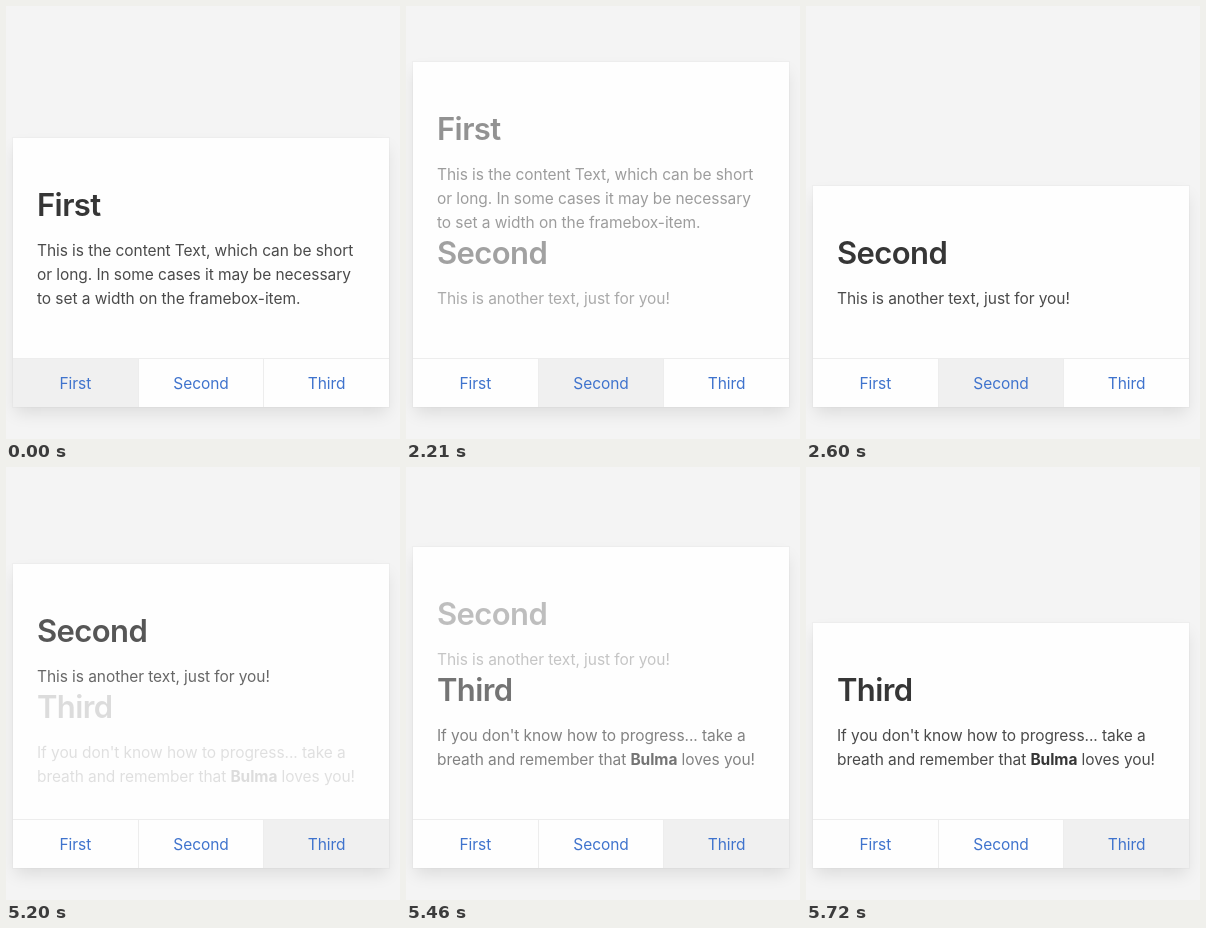
Animation of 394 by 433 pixels, one loop 7020 ms. Source, as an HTML page:

```html
<!DOCTYPE html>
<html lang="en">
<head>
<meta charset="utf-8">
<style>
  html, body { margin: 0; width: 100%; height: 100%; overflow: hidden; background: #f4f4f4; }
  body {
    position: relative;
    font: 15.5px/24px Inter, "Open Sans", sans-serif;
    font-optical-sizing: none;
    letter-spacing: -.07px;
    color: #4a4a4a;
  }
  .card {
    position: absolute; left: 7px; bottom: 32px; width: 376px;
    background: #fefefe;
    box-shadow: 0 8px 16px -2px rgba(10,10,10,.1), 0 0 0 1px rgba(10,10,10,.02);
  }
  .content { padding: 48px 0 48px 24px; white-space: nowrap; }
  h1, p { position: relative; margin: 0; }
  h1 { top: 1px; margin-bottom: 16px; font-size: 31px; line-height: 36px; font-weight: 600; letter-spacing: -.6px; color: #363636; }
  p { top: .5px; }
  strong { font-weight: 700; color: #363636; }
  .tabs { display: flex; height: 48px; border-top: 1px solid #ededed; }
  .tabs span { flex: 1; line-height: 49px; height: 48px; text-align: center; color: #3f73cd; border-right: 1px solid #ededed; }
  .tabs span:last-child { border: 0; }
  .tabs .active { background: #f0f0f0; }
</style>
</head>
<body>
<div class="card">
  <div class="content">
    <section><h1>First</h1><p>This is the content Text, which can be short<br>or long. In some cases it may be necessary<br>to set a width on the framebox-item.</p></section>
    <section><h1>Second</h1><p>This is another text, just for you!</p></section>
    <section><h1>Third</h1><p>If you don't know how to progress... take a<br>breath and remember that <strong>Bulma</strong> loves you!</p></section>
  </div>
  <div class="tabs"><span>First</span><span>Second</span><span>Third</span></div>
</div>
<script>
const LOOP = 7020, STEP = 130, FADE = 500, MAX_HEIGHT = 500;
const switches = [-FADE, 1978, 5117];
const items = document.querySelectorAll('section');
const tabs = document.querySelectorAll('.tabs span');

const progress = (t, i) =>
  i < switches.length ? Math.min(1, Math.max(0, (t - switches[i]) / FADE)) : 0;

function draw(now) {
  const t = Math.floor(now % LOOP / STEP) * STEP;
  items.forEach((item, i) => {
    const entering = progress(t, i), leaving = progress(t, i + 1);
    const shown = entering * (1 - leaving);
    item.style.display = shown > 0 ? 'block' : 'none';
    item.style.opacity = shown;
    item.style.maxHeight = shown * MAX_HEIGHT + 'px';
    tabs[i].classList.toggle('active', entering > 0 && leaving === 0);
  });
}

function frame() {
  draw(performance.now());
  requestAnimationFrame(frame);
}
frame();
</script>
</body>
</html>
```
